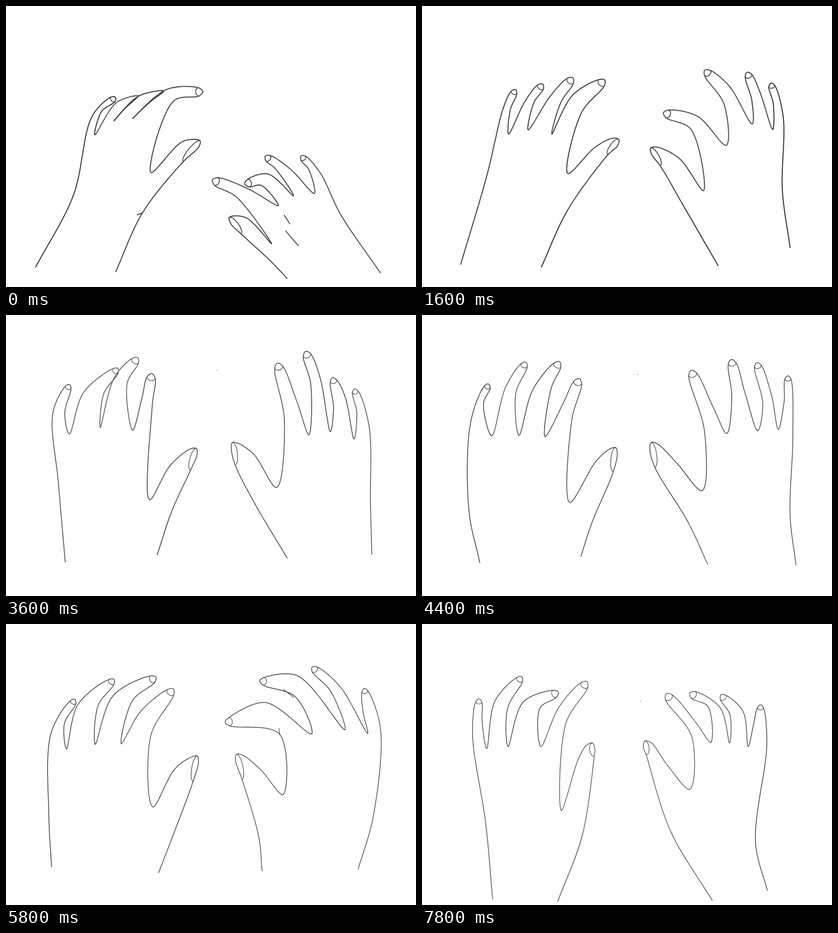
Animation, 900 px wide and 619 px high, one loop 8000 ms. Source, as an HTML page:

```html
<!DOCTYPE html>
<html lang="en">
<head>
<meta charset="utf-8">
<title>Hands</title>
<style>
html, body { margin: 0; width: 100%; height: 100%; overflow: hidden; background: #fefefe; }
svg { display: block; width: 100%; height: 100%; }
path { fill: none; stroke-linecap: round; stroke-linejoin: round; }
</style>
</head>
<body>
<svg id="stage" viewBox="0 0 900 619"></svg>
<script>
const STEP = 200, LOOP = 8000, RADII = [6.5, 7.5, 8.5, 9, 10];
const poses = [];

const pairs = s => s.split(',').map(p => p.trim().split(' ').map(Number));

// A hand is: two wrist points, then for pinky to thumb a side, tip, side and valley
// (the wrist again after the thumb), then the wrist end.
// hidden: fingers without a visible tip, lift: finger after which the pencil is lifted.
const hand = (text, hidden = [], lift = -1) =>
  ({ points: pairs(text), radii: RADII.map((r, f) => hidden.includes(f) ? 1.5 : r), lift });

// reach: sway outward and upward on the way to the next pose
function pose(at, width, grey, reach, creases, ...hands) {
  poses.push({ at, width, grey, reach, creases, hands });
}

pose(0, 2.1, 62, [0, 0], 'M288 460L299 456M611 461L623 480M614 495Q625 510 642 528',
  hand(`65 575, 148 417, 189 243, 240 201, 210 232, 195 284, 242 213, 290 198, 262 225, 237 253,
    290 199, 346 187, 318 210, 278 248, 352 184, 432 188, 368 209, 318 367,
    385 300, 426 297, 389 343, 300 455, 241 585`, [1, 2]),
  hand(`822 588, 735 460, 690 368, 648 330, 665 361, 677 413, 625 360, 569 331, 590 357, 631 418,
    575 370, 524 392, 560 395, 598 440, 530 402, 453 383, 505 420, 583 524,
    530 468, 490 466, 516 502, 582 563, 617 600`));

pose(8, 2.2, 66, [0, 0], '',
  hand(`85 569, 142 375, 180 220, 205 184, 194 228, 190 282, 226 210, 265 172, 246 212, 233 273,
    282 198, 331 158, 305 212, 285 282, 330 197, 401 163, 350 235, 320 369,
    380 311, 432 294, 408 328, 320 449, 262 575`),
  hand(`808 532, 791 405, 793 245, 766 170, 771 215, 770 272, 742 190, 714 146, 724 208, 725 260,
    675 177, 621 141, 663 216, 668 307, 605 243, 530 235, 590 271, 618 407,
    565 336, 502 313, 523 352, 571 435, 650 572`));

pose(12, 2.3, 66, [10, 0], 'M652 117L653 139M659 178L667 219M644 347L635 369M709 304L703 341',
  hand(`85 551, 112 380, 103 240, 130 175, 140 220, 144 275, 190 180, 233 127, 217 197, 202 274,
    252 165, 301 102, 283 180, 268 270, 305 185, 347 130, 322 240, 324 409,
    375 322, 415 294, 414 326, 378 415, 349 526`),
  hand(`788 533, 798 400, 805 245, 779 131, 780 190, 777 249, 752 135, 702 48, 714 125, 743 237,
    695 125, 619 73, 653 141, 708 262, 685 165, 612 134, 662 190, 628 355,
    560 262, 514 247, 526 300, 580 430, 624 551`, [], 2));

pose(18, 1.9, 88, [22, 10], 'M463 122h.5',
  hand(`130 544, 115 370, 103 215, 139 153, 129 215, 139 262, 170 171, 246 118, 215 172, 207 248,
    238 137, 289 94, 266 150, 278 254, 299 180, 320 129, 321 200, 315 407,
    360 332, 418 294, 405 342, 364 432, 332 528`),
  hand(`803 527, 800 415, 797 245, 765 163, 770 215, 764 273, 745 182, 717 138, 719 205, 712 257,
    690 140, 658 80, 669 152, 665 264, 640 195, 596 106, 611 230, 594 380,
    545 308, 497 281, 503 330, 547 417, 617 535`));

pose(22, 1.6, 66, [5, 20], 'M473 131h.5',
  hand(`127 546, 103 430, 107 235, 146 152, 135 195, 153 266, 183 160, 228 104, 206 172, 213 265,
    243 165, 302 103, 284 160, 270 268, 312 190, 345 140, 329 230, 324 413,
    382 322, 425 292, 420 345, 374 455, 349 531`),
  hand(`821 551, 808 440, 814 270, 803 134, 795 190, 782 252, 768 180, 735 105, 748 195, 737 255,
    710 175, 679 98, 680 180, 669 261, 640 205, 591 122, 620 255, 615 387,
    560 327, 503 281, 511 335, 585 458, 627 549`));

pose(29, 1.5, 62, [35, 40], 'M609 144L632 162M599 230L601 242',
  hand(`100 535, 94 420, 99 240, 151 166, 128 220, 133 275, 158 177, 237 122, 202 180, 196 265,
    235 158, 329 117, 278 168, 253 264, 296 192, 367 143, 318 245, 322 403,
    370 320, 420 291, 411 346, 365 470, 335 548`),
  hand(`773 540, 806 425, 822 230, 786 142, 784 195, 794 241, 735 140, 672 95, 712 147, 744 233,
    640 114, 557 125, 635 160, 671 242, 570 173, 481 216, 600 242, 608 376,
    560 322, 506 287, 518 342, 555 470, 562 544`));

pose(39, 1.5, 72, [0, 0], 'M479 170h.5',
  hand(`155 606, 140 440, 111 245, 125 165, 132 215, 142 274, 160 170, 219 116, 188 185, 189 270,
    222 172, 299 150, 259 185, 261 270, 300 184, 362 127, 316 218, 306 411,
    343 298, 374 262, 378 291, 352 465, 298 611`),
  hand(`758 587, 732 480, 757 265, 743 178, 727 225, 716 270, 705 193, 656 156, 676 200, 675 262,
    655 185, 588 152, 628 182, 634 261, 602 218, 536 154, 592 248, 588 364,
    540 313, 489 258, 492 288, 545 455, 637 609`));

const lerp = (a, b, u) => a + (b - a) * u;
const mix = (a, b, u) => a.map((v, i) => lerp(v, b[i], u));
const dist = (a, b) => Math.hypot(a[0] - b[0], a[1] - b[1]);
const rand = n => { const v = Math.sin(n * 12.9898) * 43758.5453; return v - Math.floor(v); };
const fix = p => p.map(v => v.toFixed(1)).join(' ');

// Centripetal Catmull-Rom between p[i] and p[i + 1]
function spline(p, i, u) {
  const b = p[i], c = p[i + 1];
  const a = p[i - 1] || mix(c, b, 2), d = p[i + 2] || mix(b, c, 2);
  const t1 = Math.sqrt(dist(a, b)), t2 = t1 + Math.sqrt(dist(b, c)), t3 = t2 + Math.sqrt(dist(c, d));
  const t = lerp(t1, t2, u);
  const ab = mix(a, b, t / t1), bc = mix(b, c, u), cd = mix(c, d, (t - t2) / (t3 - t2));
  return mix(mix(ab, bc, t / t2), mix(bc, cd, (t - t1) / (t3 - t1)), u);
}

function curve(p, from, to) {
  let d = 'M' + fix(p[from]);
  for (let i = from; i < to; i++)
    for (let k = 1; k <= 12; k++) d += 'L' + fix(spline(p, i, k / 12));
  return d;
}

// Arc from a to b that bulges by h
function bow(a, b, h) {
  const len = dist(a, b), n = [(a[1] - b[1]) / len * h * 4 / 3, (b[0] - a[0]) / len * h * 4 / 3];
  const shift = p => fix([p[0] + n[0], p[1] + n[1]]);
  return `M${fix(a)}C${shift(a)} ${shift(b)} ${fix(b)}`;
}

// Turns the skeleton points into strokes: six outline sections and the nails
function buildHand(p, radii, lift, side) {
  const line = p.slice(0, 2), cuts = [0], gaps = [];
  let nails = '';
  for (let f = 0; f < 5; f++) {
    const [a, tip, b, valley] = p.slice(2 + f * 4, 6 + f * 4), r = radii[f];
    const mid = mix(a, b, 0.5), len = dist(mid, tip);
    const dx = (tip[0] - mid[0]) / len, dy = (tip[1] - mid[1]) / len;
    const edge = s => [tip[0] + r * (s * dy - dx), tip[1] - r * (s * dx + dy)];
    const before = edge(side), after = edge(-side);
    line.push(a, before, tip, after, b, valley);
    if (f === 4) nails += bow(tip, b, side * 8);
    else if (r > 4) nails += bow(before, after, side * r * 0.75);
    gaps.push(f === lift ? 1 : 0);
    cuts.push(line.length - 1);
  }
  line.push(p[22]);
  const outline = cuts.map((start, n) => curve(line, start, n < 5 ? cuts[n + 1] - gaps[n] : line.length - 1));
  return [...outline, nails];
}

const stage = document.getElementById('stage');
const newPath = () => stage.appendChild(document.createElementNS('http://www.w3.org/2000/svg', 'path'));
const paths = [0, 1].map(() => Array.from({ length: 7 }, newPath));
const creases = newPath();

function ink(path, d, shade, width) {
  path.setAttribute('d', d);
  path.setAttribute('stroke', `rgb(${shade},${shade},${shade})`);
  path.setAttribute('stroke-width', width.toFixed(2));
}

function draw(step) {
  let i = poses.length - 1;
  while (poses[i].at > step) i--;
  const from = poses[i], to = poses[i + 1] || from;
  const u = (step - from.at) / (to.at - from.at || 1), sway = Math.sin(Math.PI * u);
  const width = lerp(from.width, to.width, u), grey = Math.round(lerp(from.grey, to.grey, u));

  paths.forEach((set, h) => {
    const a = from.hands[h], b = to.hands[h], side = h ? -1 : 1;
    const phase = rand(step + h * 50) * 1.5 + step * 0.9;
    // Fingers lift and sink one after another, wrists drift a little
    const warp = ([x, y]) => {
      const lift = Math.min(1, Math.max(0, (330 - y) / 150));
      return [x + sway * (4 * Math.sin(y / 90 + phase) - from.reach[0] * (h ? -0.5 : 1)),
              y + sway * lift * (10 * Math.sin(x / 45 + phase) - from.reach[1])];
    };
    const points = a.points.map((p, n) => warp(mix(p, b.points[n], u)));
    const lift = (u < 0.5 ? a : b).lift;
    buildHand(points, mix(a.radii, b.radii, u), lift, side).forEach((d, n) => {
      const shade = grey + Math.round((rand(step * 31 + h * 13 + n) - 0.5) * 30);
      ink(set[n], d, shade, n < 6 ? width : width * 0.85);
    });
  });
  ink(creases, u ? '' : from.creases, grey, width * 0.9);
}

let shown = -1;
function tick() {
  const step = Math.floor(performance.now() % LOOP / STEP);
  if (step !== shown) draw(shown = step);
  requestAnimationFrame(tick);
}
tick();
</script>
</body>
</html>
```
